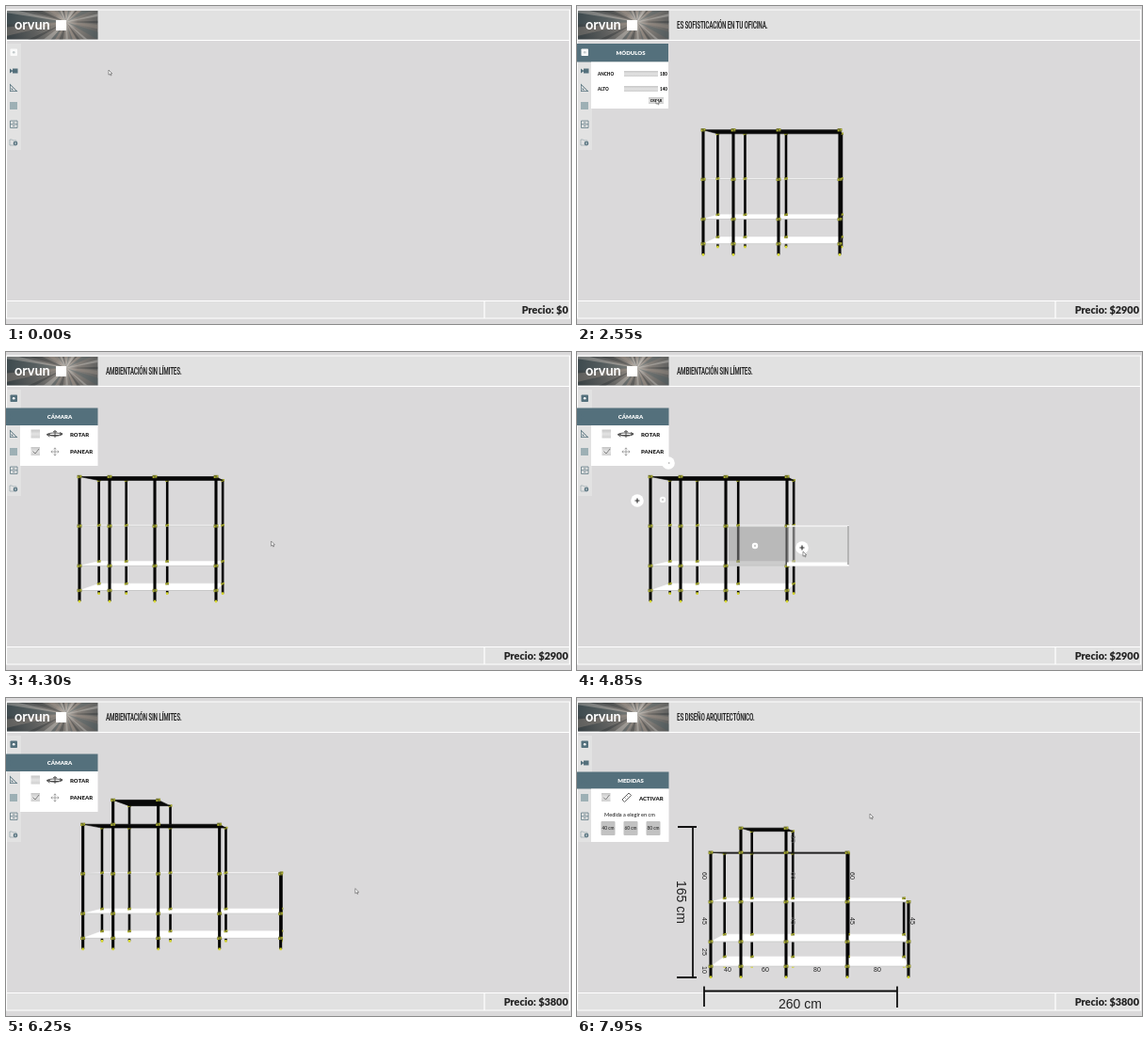
Animation, 600 px wide and 338 px high, one loop 8000 ms. Source, as an HTML page:

```html
<!DOCTYPE html>
<html lang="es">
<head>
<meta charset="utf-8">
<title>Configurador de estanterías</title>
<style>
  html, body { margin: 0; width: 100%; height: 100%; overflow: hidden; background: #dad9da; }
  svg { display: block; width: 100vw; height: 100vh; }
  text { font: 900 6px Lato, sans-serif; fill: #222; }
  .mid { text-anchor: middle; }
  .end { text-anchor: end; }
  .light { fill: #fff; }
  .price { font-size: 10.9px; }
  .brand { font: 700 14.5px Lato, sans-serif; fill: #fff; }
  .tagline { font: 500 7.4px "Roboto Condensed", Roboto, sans-serif; font-stretch: 75%; letter-spacing: -.27px; }
  .tiny { font-size: 4.6px; }
  .note { font: 500 5.6px Lato, sans-serif; }
  .choice { font: 500 4.8px Lato, sans-serif; }
  .total { font: 14px "Liberation Sans", Arial, sans-serif; }
  .size { font: 7px "Liberation Sans", Arial, sans-serif; }
  .far { fill: #777; }
</style>
</head>
<body>
<svg viewBox="0 0 600 338" preserveAspectRatio="none">
  <defs>
    <radialGradient id="photo" gradientUnits="userSpaceOnUse" cx="64" cy="16" r="62">
      <stop offset="0" stop-color="#c9c4bd"/><stop offset=".2" stop-color="#88827c"/>
      <stop offset=".55" stop-color="#5f605f"/><stop offset="1" stop-color="#3c4447"/>
    </radialGradient>
    <linearGradient id="bevel" x2="0" y2="1">
      <stop stop-color="#c6c6c6"/><stop offset=".5" stop-color="#e3e3e3"/><stop offset="1" stop-color="#d0d0d0"/>
    </linearGradient>
    <clipPath id="photoBox"><rect x="1" y="5" width="96.5" height="30.5"/></clipPath>
  </defs>

  <rect width="600" height="338" fill="#dad9da"/>
  <path d="M1 4H599V36H1zM1 314H599V332H1z" fill="#e1e1e1"/>
  <path d="M.5 4V332H598.5V4zM0 36.5H599M0 313.5H599M508 313.5V332" fill="none" stroke="#fff" stroke-width="1.2"/>
  <g clip-path="url(#photoBox)">
    <rect x="1" y="5" width="97" height="31" fill="url(#photo)"/>
    <g id="rays"></g>
  </g>
  <text class="brand" x="9" y="25">orvun</text>
  <rect x="53" y="15" width="11" height="11" fill="#fff"/>
  <g id="taglines"></g>
  <text id="price" class="price end" x="597" y="327"></text>

  <g id="rack"></g>
  <g id="overlay"></g>
  <g id="dims"></g>

  <rect x="1" y="40" width="15" height="113" fill="#e2e2e2"/>
  <g id="panels">
    <g>
      <rect y="40" width="97" height="19.5" fill="#54707c"/>
      <rect x="15" y="59.5" width="82" height="49.5" fill="#fff"/>
      <text class="mid light" x="57" y="52">MÓDULOS</text>
      <text class="tiny" x="22" y="73.5">ANCHO</text><text class="tiny" x="22" y="89.5">ALTO</text>
      <g fill="url(#bevel)">
        <rect x="50" y="69" width="36" height="6"/><rect x="50" y="85" width="36" height="6"/><rect x="76" y="97" width="16" height="7"/>
      </g>
      <text class="tiny end" x="96" y="73.5">180</text><text class="tiny end" x="96" y="89.5">140</text>
      <text class="mid" x="84" y="102" style="font-size:3.8px">CREAR</text>
    </g>
    <g>
      <rect y="59.5" width="97.5" height="18.5" fill="#54707c"/>
      <rect x="15" y="78" width="82.5" height="43" fill="#fff"/>
      <text class="mid light" x="57" y="71">CÁMARA</text>
      <g fill="url(#bevel)">
        <rect x="26.5" y="82.5" width="9.5" height="9"/><rect x="26.5" y="101" width="9.5" height="9"/>
      </g>
      <path id="panCheck" d="M28.5 105.5l2.5 2.5 4-5" fill="none" stroke="#777" stroke-width=".9"/>
      <path d="M43.5 87.5c3-2 13-2 16.500 0c-4 2.300-12 2.300-16.500 0zM46.500 90l-3-2 3.500-.8M57 85.500l3 1.500-3.500 1M52 83.500V91M50 85l2-1.200 2 1.200M47 88.500h9" fill="none" stroke="#444" stroke-width=".9"/>
      <path d="M52 102v8M48 106h8M50.700 103.300l1.300-1.500 1.300 1.500M50.700 108.700l1.300 1.500 1.300-1.500M49.300 104.700l-1.500 1.300 1.500 1.300M54.700 104.700l1.500 1.300-1.500 1.300" fill="none" stroke="#888" stroke-width=".7"/>
      <text x="68" y="90">ROTAR</text><text x="68" y="108">PANEAR</text>
    </g>
    <g>
      <rect y="78.5" width="97.5" height="18" fill="#54707c"/>
      <rect x="15" y="96.5" width="82.5" height="56.5" fill="#fff"/>
      <text class="mid light" x="57" y="89.5">MEDIDAS</text>
      <rect x="26" y="101" width="9.5" height="9" fill="url(#bevel)"/>
      <path id="sizeCheck" d="M28 105.5l2.5 2.5 4-5" fill="none" stroke="#777" stroke-width=".9"/>
      <path d="M48 108l7-7 2.500 2.500-7 7zM50.500 105.500l1 1M52.500 103.500l1 1" fill="none" stroke="#555" stroke-width=".9"/>
      <text x="66" y="108.5">ACTIVAR</text>
      <text class="note mid" x="56" y="125.5">Medida a elegir en cm</text>
      <g fill="#c2c2c2">
        <rect x="25.5" y="131" width="15" height="15" rx="1"/><rect x="49.5" y="131" width="15" height="15" rx="1"/><rect x="73.5" y="131" width="15" height="15" rx="1"/>
      </g>
      <g class="mid">
        <text class="choice" x="33" y="140">40 cm</text><text class="choice" x="57" y="140">60 cm</text><text class="choice" x="81" y="140">80 cm</text>
      </g>
    </g>
  </g>

  <g id="icons" fill="#54707c">
    <g><rect x="4.5" y="45.5" width="7.5" height="7.500" rx=".8"/><circle id="dot" cx="8.250" cy="49.250" r="1.300"/></g>
    <path d="M7 66.500h5.500v5h-5.500zM4 66.500l3.500 2.500-3.500 2.500z"/>
    <path fill-rule="evenodd" d="M4 82.500v8.500h8.500zM4.700 84.300v6h6zM5.700 87v2.300H8z"/>
    <rect x="4" y="102" width="8" height="8" fill="#9db0b5"/>
    <path d="M4.500 122h7.500v7.500h-7.500zM4.500 125.700h7.500M7 123.900h2.500M7 127.600h2.500" fill="none" stroke="#607a85" stroke-width=".8"/>
    <g><path d="M4 142h2.500l1 1H11v5H4z" fill="none" stroke="#93a5ab" stroke-width=".7"/><circle cx="10" cy="146" r="2.300"/><path d="M10 144.700v2.600" stroke="#fff" stroke-width=".8"/></g>
  </g>
  <path id="cursor" d="M0 0V5.200L1.300 4.200 2.200 6 3 5.600 2.200 3.800H3.800z" fill="#fff" stroke="#555" stroke-width=".6"/>
</svg>
<script>
const LOOP = 8000;
const $ = id => document.getElementById(id);
const within = (t, a, b) => t >= a && t < b;
const smooth = p => p * p * (3 - 2 * p);
const ramp = (t, a, b) => smooth(Math.min(1, Math.max(0, (t - a) / (b - a))));

// Keys are [time, x, y]; eased between neighbours.
function follow(keys, t) {
  const next = keys.findIndex(k => k[0] > t);
  if (next < 0) return keys.at(-1).slice(1);
  if (!next) return keys[0].slice(1);
  const [t0, x0, y0] = keys[next - 1], [t1, x1, y1] = keys[next];
  const p = ramp(t, t0, t1);
  return [x0 + (x1 - x0) * p, y0 + (y1 - y0) * p];
}

const cursorPath = [
  [50, 109, 68], [850, 240, 188], [1000, 240, 188], [1450, 7, 47], [1750, 7, 47],
  [2100, 84, 99], [2600, 84, 99], [2780, 8, 67], [2980, 8, 67], [3300, 26, 85],
  [3380, 26, 85], [3550, 30, 104], [3620, 30, 104], [3830, 340, 200], [4160, 284, 201],
  [4280, 284, 201], [4500, 190, 204], [4760, 240, 212], [5080, 240, 212], [5300, 134, 157],
  [5560, 136, 121], [5950, 136, 121], [6200, 366, 200], [6500, 429, 232], [6600, 429, 232],
  [7020, 10, 86], [7300, 10, 86], [7520, 30, 104], [7690, 30, 104], [7930, 311, 123]
];
const panPath = [[3850, 56, -.7], [4150, 0, 0], [6210, 0, 0], [6490, 63, 31.7], [7690, 63, 31.7], [7740, 64, 31.7]];
const taglines = [
  { text: "ES SOFISTICACIÓN EN TU OFICINA.", from: 700, to: 3150 },
  { text: "AMBIENTACIÓN SIN LÍMITES.", from: 3830, to: 6350 },
  { text: "ES DISEÑO ARQUITECTÓNICO.", from: 7200, to: 9000 }
];
const panelTimes = [[1500, 1833, 2640, 2840], [2800, 3080, 7140, 7340], [7240, 7500, 9000, 9200]];

const ADD_SIDE = 5000, ADD_TOWER = 5640;
const DEPTH = .093, EYE_X = 300, EYE_Y = 175;
const PEAK = 106.6, TOP = 132.5, SHELVES = [185, 227.3, 253.5], FLOOR = 265;
const far = ([x, y]) => [x + (EYE_X - x) * DEPTH, y + (EYE_Y - y) * DEPTH];
const poly = (points, attrs) => `<polygon points="${points.map(p => p.map(n => n.toFixed(2))).join(" ")}" ${attrs}/>`;
const line = ([ax, ay], [bx, by], color, width) =>
  `<path d="M${ax} ${ay}L${bx} ${by}" stroke="${color}" stroke-width="${width}"/>`;
const box = (x, y, w, h, fill) =>
  `<rect x="${(x - w / 2).toFixed(2)}" y="${(y - h / 2).toFixed(2)}" width="${w}" height="${h}" fill="${fill}"/>`;

function drawRack(t) {
  if (t < 2300) return "";
  const [px, py] = follow(panPath, t);
  const near = (x, y) => [x + px, y + py];
  const behind = (x, y) => far(near(x, y));
  const side = t >= ADD_SIDE, tower = t >= ADD_TOWER;
  const peak = tower ? PEAK : TOP;
  const columns = [[78, TOP], [110, peak], [158, peak], [223, TOP]];
  if (side) columns.push([288, SHELVES[0]]);
  const levels = [PEAK, TOP, ...SHELVES];
  const right = side ? 288 : 223;

  const posts = (place, width) => columns.map(([x, top]) => {
    const foot = place(x, FLOOR);
    return line(place(x, top), foot, "#050505", width) + box(...foot, 2.4, 2.6, "#d4d52c");
  }).join("");
  const joints = (place, size) => columns.map(([x, top]) => levels.filter(y => y >= top).map(y => {
    const [jx, jy] = place(x, y);
    return box(jx, jy, size, size * .7, "#6f712c") + box(jx - size * .3, jy + .6, 1.4, 1.5, "#bcbe30")
      + box(jx + size * .3, jy - .5, 1.4, 1.5, "#bcbe30");
  }).join("")).join("");
  const board = (x0, x1, y, color, edge) => {
    const a = near(x0, y), b = near(x1, y);
    return poly([a, b, far(b), far(a)], `fill="${color}" stroke="${color}" stroke-width=".6"`) + line(a, b, edge, .6);
  };

  return posts(behind, 2.6)
    + SHELVES.toReversed().map(y => board(78, right, y, "#fff", "#aaa")).join("")
    + joints(behind, 3.6)
    + board(78, 223, TOP, "#080808", "#222") + (tower ? board(110, 158, PEAK, "#080808", "#222") : "")
    + posts(near, 3.1) + joints(near, 4.8);
}

const button = (x, y, sign) => `<circle cx="${x}" cy="${y}" r="6.8" fill="#fff"/>`
  + `<path d="${sign === "+" ? `M${x - 2.5} ${y}h5M${x} ${y - 2.5}v5` : `M${x - 1.2} ${y}h2.4`}" stroke="#333" stroke-width="1.2"/>`;
const pip = (x, y) => `<circle cx="${x}" cy="${y}" r="3.2" fill="#fff"/><circle cx="${x}" cy="${y}" r="1.2" fill="#ccc"/>`;

function drawOverlay(t) {
  if (within(t, 4500, ADD_SIDE)) {
    const ghost = t < 4700 ? "" : `<path d="M223 185H288V227H223" fill="#ddd" fill-opacity=".5" stroke="#f4f4f4" stroke-width="1.5"/>
      <path d="M223 223.5H288V227H223z" fill="#fff"/><path d="M288 185V226" stroke="#b5b5b5" stroke-width="2"/>`;
    return `<rect x="161" y="186" width="62" height="41" fill="#999" fill-opacity=".5"/>` + ghost
      + pip(91, 157) + pip(189, 206) + button(64, 158, "+") + button(97, 118, "-") + button(239, 208, "+");
  }
  if (within(t, 5220, ADD_TOWER)) {
    const ghost = t < 5480 ? "" : `<path d="M110 133V107H158V133" fill="#ddd" fill-opacity=".5" stroke="#bbb" stroke-width="1.5"/>`;
    return `<rect x="112" y="135" width="45" height="49" fill="#999" fill-opacity=".5"/>` + ghost
      + pip(134, 158) + button(134, 118, "+");
  }
  return "";
}

function buildDims() {
  const label = (text, x, y, kind, turn) =>
    `<text class="mid ${kind}" transform="translate(${x} ${y}) rotate(${turn})">${text}</text>`;
  const heights = [[60, 189], [45, 237], [25, 270], [10, 289]].map(([n, y]) => label(n, 133, y, "size", 90));
  const widths = [[40, 160], [60, 200], [80, 255], [80, 319]].map(([n, x]) => label(n, x, 291, "size", 0));
  const others = [[60, 290, 189], [45, 290, 237], [45, 354, 237]].map(([n, x, y]) => label(n, x, y, "size", 90));
  const hidden = [[25, 150], [60, 189], [45, 237]].map(([n, y]) => label(n, 227, y, "size far", 90));
  return `<path d="M107 137H127M123 137V297M106 297H127M135 311.5H340M135 306.5V328M340 306.5V329" fill="none" stroke="#111" stroke-width="1.8"/>`
    + label("165 cm", 105.5, 217, "total", 90) + label("260 cm", 237, 329.5, "total", 0)
    + [...heights, ...widths, ...others, ...hidden].join("");
}

function buildRays() {
  const tones = ["#23292c", "#a3958a", "#465960", "#d6d3ce"];
  return Array.from({ length: 28 }, (_, i) => {
    const angle = i * Math.PI / 14 + Math.sin(i * 5) * .08, spread = .04 + .03 * (i % 3);
    const tip = a => [64 + 85 * Math.cos(a), 17 + 85 * Math.sin(a)];
    return poly([[64, 17], tip(angle - spread), tip(angle + spread)], `fill="${tones[i % 4]}" opacity=".35"`);
  }).join("");
}

$("rays").innerHTML = buildRays();
$("dims").innerHTML = buildDims();
$("taglines").innerHTML = taglines.map(l =>
  `<text class="tagline" transform="translate(106 23.8) scale(1 1.4)">${l.text}</text>`).join("");
const lines = [...$("taglines").children], panels = [...$("panels").children], icons = $("icons").children;
const show = (node, on) => { node.style.visibility = on ? "visible" : "hidden"; };

function render(t) {
  lines.forEach((node, i) => {
    const { from, to } = taglines[i];
    node.style.opacity = ramp(t, from, from + 480) * (1 - ramp(t, to, to + 480));
  });
  panels.forEach((node, i) => {
    const [a, b, c, d] = panelTimes[i];
    const open = ramp(t, a, b) * (1 - ramp(t, c, d));
    node.setAttribute("transform", `translate(${-97.5 * (1 - open)} 0)`);
    show(node, open > 0);
  });
  const lit = [t < 2720, within(t, 2720, 3500), within(t, 6990, 7240)];
  lit.forEach((on, i) => icons[i].setAttribute("fill", on ? "#fafafa" : "#54707c"));
  $("dot").setAttribute("fill", lit[0] ? "#c3cacc" : "#fff");
  $("panCheck").style.opacity = t >= 3580 ? 1 : 0;
  $("sizeCheck").style.opacity = t >= 7600 ? 1 : 0;

  const price = t < 2300 ? 0 : t < ADD_SIDE ? 2900 : t < ADD_TOWER ? 3450 : 3800;
  $("price").textContent = `Precio: $${price}`;
  $("rack").innerHTML = drawRack(t);
  $("overlay").innerHTML = drawOverlay(t);
  show($("dims"), t >= 7740);
  $("cursor").setAttribute("transform", `translate(${follow(cursorPath, t)})`);
}

const start = performance.now();
function tick() {
  render((performance.now() - start) % LOOP);
  requestAnimationFrame(tick);
}
tick();
</script>
</body>
</html>
```
